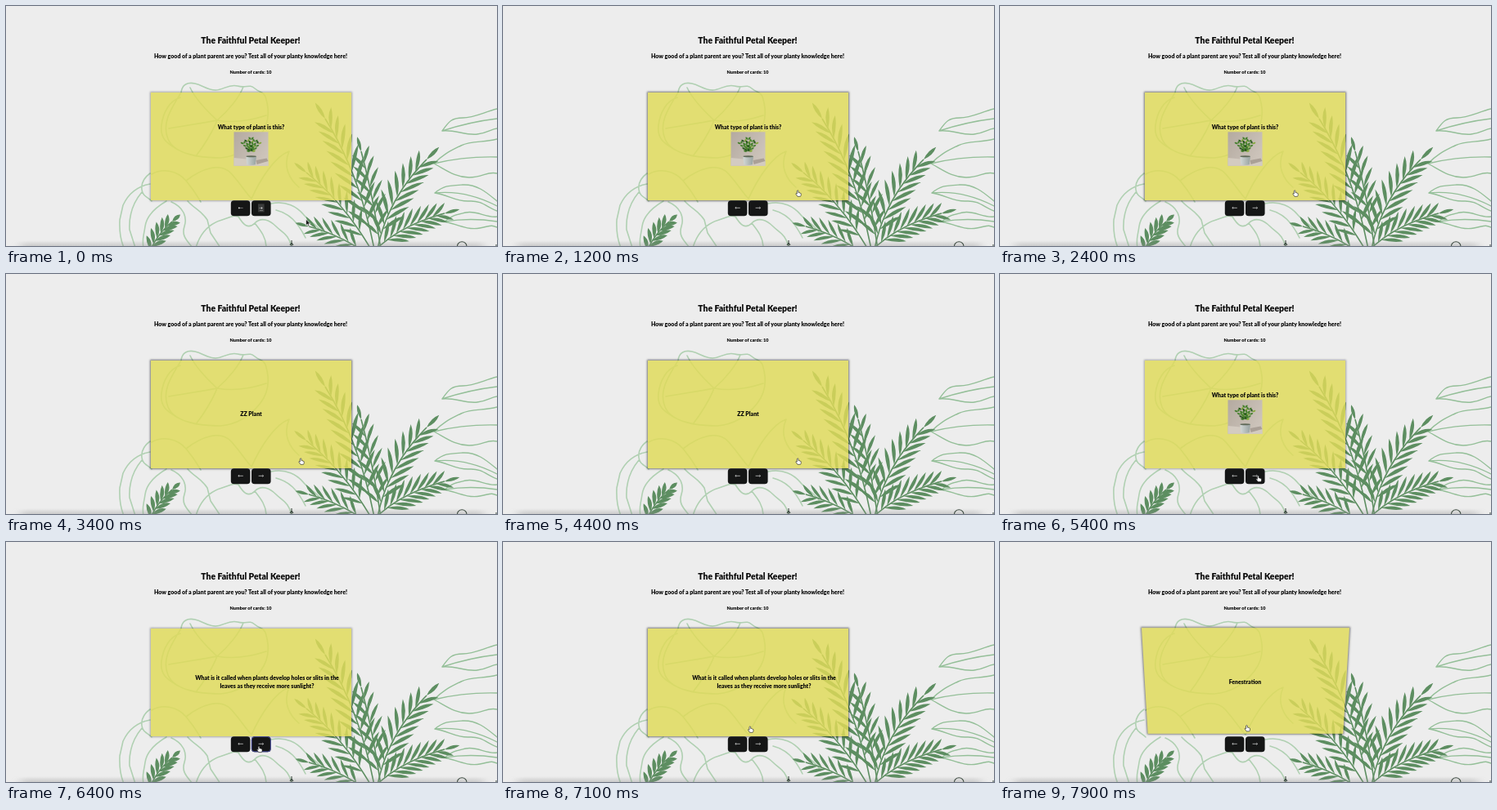
Write an HTML page that moves like this. It is 600x294 px and loops after 8000 ms.

```html
<!DOCTYPE html>
<html lang="en">
<head>
<meta charset="utf-8">
<title>Plant flashcards</title>
<style>
  html, body { margin: 0; width: 100%; height: 100%; overflow: hidden; background: #ededed; }
  #stage { position: relative; width: 600px; height: 294px; overflow: hidden; }
  svg { display: block; position: absolute; left: 0; top: 0; overflow: visible; }
  text { font-family: Lato, "Open Sans", sans-serif; font-weight: 900; text-anchor: middle; fill: #080808; }
  #card { position: absolute; left: 176.5px; top: 106px; width: 245.5px; height: 132px;
          background: rgba(224,219,90,.83); }
  .q { font-size: 6.95px; }
</style>
</head>
<body>
<div id="stage">
  <svg width="600" height="294" viewBox="0 0 600 294">
    <defs>
      <linearGradient id="fade" x1="0" y1="0" x2="0" y2="1">
        <stop offset="0" stop-color="#888" stop-opacity="0"/>
        <stop offset="1" stop-color="#888" stop-opacity=".45"/>
      </linearGradient>
      <linearGradient id="wall" x1="0" y1="0" x2="1" y2=".6">
        <stop offset="0" stop-color="#b4aaa0"/>
        <stop offset="1" stop-color="#cdc4bb"/>
      </linearGradient>
      <linearGradient id="pot" x1="0" x2="1">
        <stop offset="0" stop-color="#d3d8d6"/>
        <stop offset="1" stop-color="#98a3a1"/>
      </linearGradient>
      <filter id="soft" x="-5%" width="110%" y="-50%" height="200%"><feGaussianBlur stdDeviation="6 0"/></filter>
    </defs>
    <g id="plants"></g>
    <rect x="18" y="287" width="566" height="9" fill="url(#fade)" filter="url(#soft)"/>
    <g fill="none" stroke="#3c4a40" stroke-width="1.1">
      <path d="M349 287V294M347 293l2-3 2 3"/>
      <path d="M551.5 294a5.7 5.2 0 0 1 11.4 0"/>
      <path d="M598 293h2"/>
    </g>
    <text x="299" y="46.2" font-size="10.4">The Faithful Petal Keeper!</text>
    <text x="299" y="64.4" font-size="7">How good of a plant parent are you? Test all of your planty knowledge here!</text>
    <text x="299" y="83.2" font-size="5.6">Number of cards: 10</text>
  </svg>

  <div id="card">
    <svg id="face" width="245.5" height="132" viewBox="176.5 106 245.5 132">
      <g id="photoQ">
        <text class="q" x="299" y="151.4">What type of plant is this?</text>
        <rect x="278" y="154.3" width="42" height="41.5" fill="url(#wall)"/>
        <path d="M278 186L320 190V195.8H278Z" fill="#d3cbc1"/>
        <path d="M305 189L318 186.5 320 190 306 194Z" fill="#aaa097"/>
        <g id="zz"></g>
        <path d="M292.8 184H305.4L304.4 194.2Q299 195.6 293.8 194.2Z" fill="url(#pot)"/>
        <ellipse cx="299.1" cy="184.2" rx="6.3" ry="1" fill="#5f6a58"/>
      </g>
      <text class="q" id="answer" x="299" y="174"></text>
      <g id="textQ">
        <text class="q" x="318.5" y="169">What is it called when plants develop holes or slits in the</text>
        <text class="q" x="318.5" y="179">leaves as they receive more sunlight?</text>
      </g>
    </svg>
  </div>

  <svg width="600" height="294" viewBox="0 0 600 294">
    <rect x="274.8" y="238.2" width="23.6" height="19" rx="3.8" fill="#151616"/>
    <rect x="300" y="238.2" width="23.6" height="19" rx="3.8" fill="#151616"/>
    <rect id="ring" x="300.2" y="238.6" width="23.2" height="18.2" rx="3.6" fill="none" stroke="#4a50a8" stroke-width=".9"/>
    <g id="arrows" fill="none" stroke="#ddd" stroke-width=".7">
      <path d="M289.8 247.3H283.8M285.1 246.1l-1.3 1.2 1.3 1.2"/>
      <path d="M308.6 247.3H314.6M313.3 246.1l1.3 1.2-1.3 1.2"/>
    </g>
    <g id="loading">
      <path d="M284 247.4h5.6" stroke="#999" stroke-width=".7"/>
      <circle cx="284.8" cy="247.4" r=".9" fill="#ddd"/>
      <rect x="308" y="242.4" width="7.6" height="10" fill="#3a3b3b"/>
      <circle cx="312.4" cy="247.4" r="1" fill="#ddd"/>
      <path d="M309.2 247.5h2M310 250.5h4" stroke="#888" stroke-width=".7"/>
    </g>
    <g id="cursor">
      <path id="arrow" d="M0 0V7.6L1.8 6 3 8.9 4.3 8.3 3.1 5.6H5.4Z" fill="#111" stroke="#fff" stroke-width=".6"/>
      <path id="hand" d="M-.9 .4Q0-.7 .8 .4V2.6Q1.6 2.2 2 2.9 2.8 2.5 3.1 3.3 4 3.1 4 4V5.6Q3.8 6.6 3.3 7.3H-.3L-2.4 4.2Q-2.3 3.2-1.4 3.7L-.9 4.2Z" fill="#fff" stroke="#222" stroke-width=".65" stroke-linejoin="round"/>
    </g>
  </svg>
</div>

<script>
const $ = id => document.getElementById(id);
const LOOP = 8000, STEP = 100, FLIP = 133.3;
const NEXT_CLICK = 5900;
const GREEN = '#5d8e61';

// Slim leaf from (x, y) along angle a, bowed by b
function blade(x, y, a, len, w, b = 0) {
  const c = Math.cos(a), s = Math.sin(a);
  const at = (u, v) => `${(x + u * c - v * s).toFixed(1)} ${(y + u * s + v * c).toFixed(1)}`;
  return `M${at(0, 0)}Q${at(len * .55, w + b)} ${at(len, 0)}Q${at(len * .55, b - w)} ${at(0, 0)}Z`;
}

// Pairs of blades along a quadratic stem
function frond(x0, y0, cx, cy, x1, y1, n, len, w) {
  let d = '';
  for (let i = 0; i <= n; i++) {
    const u = .2 + .8 * i / n;
    const at = (k, side) => {
      const v = 1 - k;
      const x = v * v * x0 + 2 * k * v * cx + k * k * x1;
      const y = v * v * y0 + 2 * k * v * cy + k * k * y1;
      const a = Math.atan2(v * (cy - y0) + k * (y1 - cy), v * (cx - x0) + k * (x1 - cx));
      const l = len * (.5 + .5 * Math.sin(Math.PI * (.2 + .7 * k)));
      return blade(x, y, a + side * (.75 - .25 * k), l, w, -side * 1.5);
    };
    d += i === n ? at(1, 0) : at(u, 1) + at(u - .4 / n, -1);
  }
  return `<path d="${d}"/><path d="M${x0} ${y0}Q${cx} ${cy} ${x1} ${y1}" fill="none" stroke="${GREEN}" stroke-width="1.6"/>`;
}

const pale = `
  M214 106C215 96 222 93 231 95S246 103 256 103 272 95 283 98 297 95 304 101 314 104 317 111
  C323 130 321 145 311 158S285 184 262 186C238 186 206 182 198 163S201 127 214 106
  M258 140C245 128 232 115 225 100M258 140C272 128 285 112 290 99M258 140C238 144 220 146 199 150
  M258 140C280 144 300 140 318 134M258 140Q250 160 232 184
  M213 112C200 116 192 130 190 146S196 168 210 176
  M176 205C169 210 165 217 166 225S173 234 178 239M178 206C192 198 210 202 220 214S232 230 238 240
  M176 218C160 221 149 231 143 244L139 262Q138 282 144 296M166 228C156 240 150 256 151 274L158 296
  M220 214C238 200 262 190 276 206S292 228 300 236C310 214 328 184 346 178C338 196 346 212 358 222
  M196 239C184 246 172 256 170 270S166 286 168 296M202 240C216 246 222 258 218 270S222 288 228 296
  M222 239C230 248 240 252 246 262L250 278 262 296M232 296C238 276 250 266 264 262S276 256 284 258
  M284 258C290 268 296 274 304 266S322 262 330 270 346 280 349 296M304 266C312 276 318 284 318 296
  M324 242C342 238 356 246 364 256S380 266 388 280M330 250C346 254 356 264 366 284`;
const mid = `
  M600 126C584 130 572 137 558 137S541 142 533 153C548 151 562 159 576 157S592 151 600 150M533 153Q566 142 600 138
  M600 163C583 168 570 164 556 171S535 181 523 193C538 201 549 210 566 210S588 202 600 205M523 193Q560 184 600 185
  M600 239C588 229 576 218 558 219S535 220 524 229C540 231 550 240 566 239S588 247 600 251M524 229Q562 225 600 245
  M600 258C587 260 575 250 562 253S546 256 536 264C550 267 564 275 579 272S592 268 600 271M536 264Q568 259 600 264`;

$('plants').innerHTML =
  `<g fill="none" stroke-linecap="round" stroke-linejoin="round">
    <path d="${pale}" stroke="#b0d0b2" stroke-width="1.6"/>
    <path d="${mid}" stroke="#94bf98" stroke-width="1.4"/></g><g fill="${GREEN}">` +
  [
    [450, 298, 432, 205, 390, 138, 9, 35, 4.6],
    [446, 298, 412, 240, 367, 204, 8, 29, 4],
    [454, 298, 466, 236, 514, 188, 8, 33, 4.6],
    [452, 298, 484, 268, 536, 254, 8, 29, 4.2],
    [442, 304, 408, 280, 370, 270, 6, 26, 3.8],
    [458, 298, 448, 230, 434, 178, 6, 28, 4],
    [174, 304, 184, 280, 203, 264, 5, 20, 5]
  ].map(f => frond(...f)).join('') + '</g>';

// Potted plant: five stems with leaf pairs
let leaves = '';
for (let i = 0; i < 5; i++) {
  const k = i - 2, len = 21 - Math.abs(k) * 2.5;
  for (let j = 2; j < 6; j++) {
    const u = j / 5, x = 299 + k * 4.4 * u * u, y = 185 - len * u;
    for (const s of [-1, 1]) {
      const fill = (i + j) % 3 ? '#47802f' : s > 0 ? '#86ab3e' : '#29561f';
      leaves += `<path d="${blade(x, y, -1.57 + k * .2 + s * .75, 4.6, 2.3)}" fill="${fill}"/>`;
    }
  }
}
$('zz').innerHTML = leaves;

const moves = [[0, 900, 366.6, 261.2, 360.2, 226], [4700, 5600, 360.2, 226, 309, 250.3], [6500, 7200, 309, 250.3, 301.5, 224.6]];

function pointer(t) {
  let x, y;
  for (const [a, b, x0, y0, x1, y1] of moves) {
    if (t < a) break;
    let u = Math.min(1, (t - a) / (b - a));
    u = u * u * (3 - 2 * u);
    x = x0 + (x1 - x0) * u;
    y = y0 + (y1 - y0) * u;
  }
  return [x, y];
}

function turn(t, start) {
  const u = Math.min(1, Math.max(0, (t - start) / FLIP));
  return 180 * (1 - (1 - u) * (1 - u));
}

const show = (id, on) => { $(id).style.display = on ? '' : 'none'; };

function draw(t) {
  const [x, y] = pointer(t);
  const onCard = x > 176 && x < 422 && y > 106 && y < 238;
  const onNext = x > 300 && x < 324 && y >= 238 && y < 257;
  const angle = turn(t, 2900) - turn(t, 4490) + turn(t, 7800);
  const turning = angle > 0 && angle < 180;
  const flipped = angle > 90, second = t >= NEXT_CLICK;

  const card = $('card').style;
  card.transform = turning ? `perspective(410px) rotateX(${angle}deg)` : 'none';
  card.boxShadow = `0 0 2.2px .8px rgba(0,0,0,${onCard ? .5 : .3})`;
  $('face').style.transform = flipped && turning ? 'scaleY(-1)' : 'none';

  show('photoQ', !flipped && !second);
  show('textQ', !flipped && second);
  show('answer', flipped);
  $('answer').textContent = second ? 'Fenestration' : 'ZZ Plant';
  show('loading', t < 100);
  show('arrows', t >= 100);
  show('ring', second && onNext);
  show('hand', onCard || onNext);
  show('arrow', !onCard && !onNext);
  $('cursor').setAttribute('transform', `translate(${x} ${y})`);
}

function tick(now) {
  draw(Math.floor((now % LOOP) / STEP) * STEP);
  requestAnimationFrame(tick);
}
draw(0);
requestAnimationFrame(tick);
</script>
</body>
</html>
```
